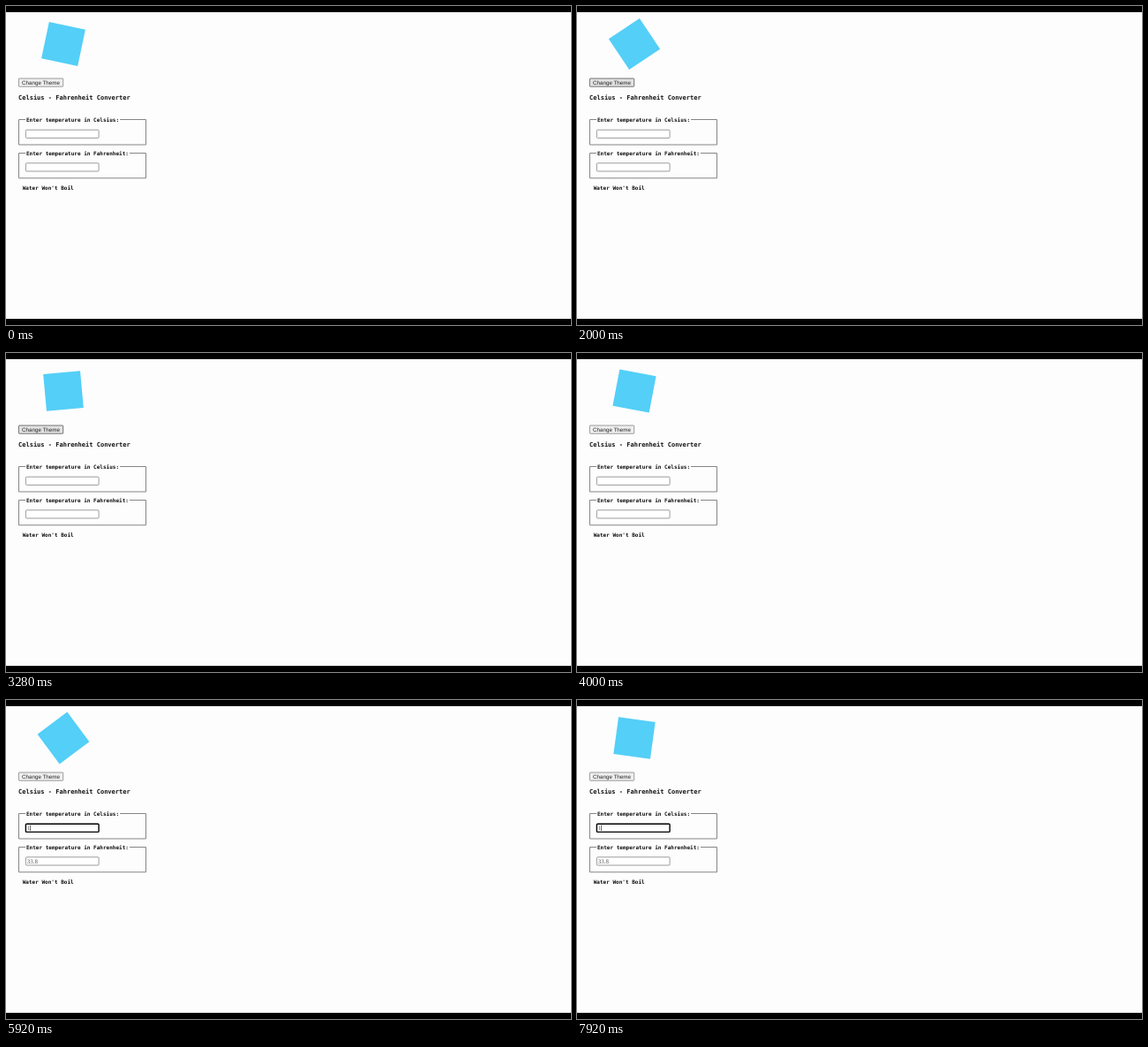
Animation, 640 px wide and 361 px high, one loop 8000 ms. Source, as an HTML page:

```html
<!DOCTYPE html>
<html lang="en">
<head>
<meta charset="utf-8">
<title>Temperature converter</title>
<style>
  html, body { margin: 0; height: 100%; overflow: hidden; background: #fdfdfd; }
  svg { display: block; text-rendering: geometricPrecision; --ink: #111; --line: #858585; --edge: #858585; }
  svg.dark { --ink: #fff; --line: #c4c4c4; --edge: #fff; }
  text { font: bold 6.02px "DejaVu Sans Mono", monospace; fill: var(--ink); }
  text.title { font-size: 7.03px; }
  text.button { font: 6.25px "Liberation Sans", Arial, sans-serif; fill: #222; }
  text.value { font: 6.9px "Liberation Serif", Times, serif; fill: #555; }
  .set { fill: none; stroke: var(--line); }
  .field { fill: #fff; stroke: var(--edge); stroke-width: .8; }
  .hover { stroke: #444; }
  .focus { stroke: #000; stroke-width: 1.4; }
  #button { fill: #efefef; stroke: #858585; stroke-width: .8; }
  #button.hover { fill: #e2e2e2; stroke: #555; }
</style>
</head>
<body>
<svg id="stage" width="640" height="361" viewBox="0 0 640 361">
  <rect width="640" height="361" fill="#fdfdfd"/>
  <path d="M0 0h640v7H0zM0 354h640v7H0z"/>
  <rect id="panel" x="10" y="13" width="150" height="199"/>
  <rect id="mark" x="44" y="22" width="42" height="42" fill="#53cff8"/>

  <rect id="button" x="14.4" y="82" width="50.3" height="9.2" rx=".6"/>
  <text class="button" x="18" y="88.8">Change Theme</text>
  <text class="title" x="14" y="106.1">Celsius - Fahrenheit Converter</text>

  <path class="set" d="M22 128.5H14.5V157H158.5V128.5H129"/>
  <text x="23" y="130.7">Enter temperature in Celsius:</text>
  <rect id="celsius" class="field" x="22.4" y="140.2" width="82.7" height="9.2" rx="1"/>
  <text id="degC" class="value" x="23.8" y="147.1"></text>
  <path id="caret" d="M27.6 141.6v6.4" stroke="#222" stroke-width=".7"/>

  <path class="set" d="M22 166.5H14.5V194.8H158.5V166.5H140"/>
  <text x="23" y="168.5">Enter temperature in Fahrenheit:</text>
  <rect class="field" x="22.4" y="177.8" width="82.7" height="9.2" rx="1"/>
  <text id="degF" class="value" x="23.8" y="184.8"></text>

  <text x="18.7" y="208">Water Won't Boil</text>
</svg>
<script>
  const LOOP = 8000, STEP = 80;
  const DARK = 2160, LIGHT = 3040, LEAVE = 4000, HOVER = 4560, CLICK = 4960, TYPE = 5600;
  const $ = id => document.getElementById(id);
  const within = (t, from, to = LOOP) => t >= from && t < to;

  function draw(now) {
    const t = Math.floor(now % LOOP / STEP) * STEP;
    const dark = within(t, DARK, LIGHT), typed = t >= TYPE;

    $("stage").classList.toggle("dark", dark);
    $("panel").setAttribute("visibility", dark ? "visible" : "hidden");
    $("mark").setAttribute("transform", `rotate(${12 + t * 0.0222} 65 43)`);
    $("button").classList.toggle("hover", within(t, 1840, LEAVE));

    $("celsius").classList.toggle("hover", within(t, HOVER, CLICK));
    $("celsius").classList.toggle("focus", t >= CLICK);
    $("degC").textContent = typed ? "1" : "";
    $("degF").textContent = typed ? 1 * 9 / 5 + 32 : "";

    // The caret blinks once a second, restarting at each input.
    const since = t - (typed ? TYPE : CLICK);
    $("caret").setAttribute("visibility", since >= 0 && since % 1000 < 500 ? "visible" : "hidden");
    $("caret").setAttribute("transform", `translate(${typed ? 0 : -3.4})`);

    requestAnimationFrame(draw);
  }
  requestAnimationFrame(draw);
</script>
</body>
</html>
```
